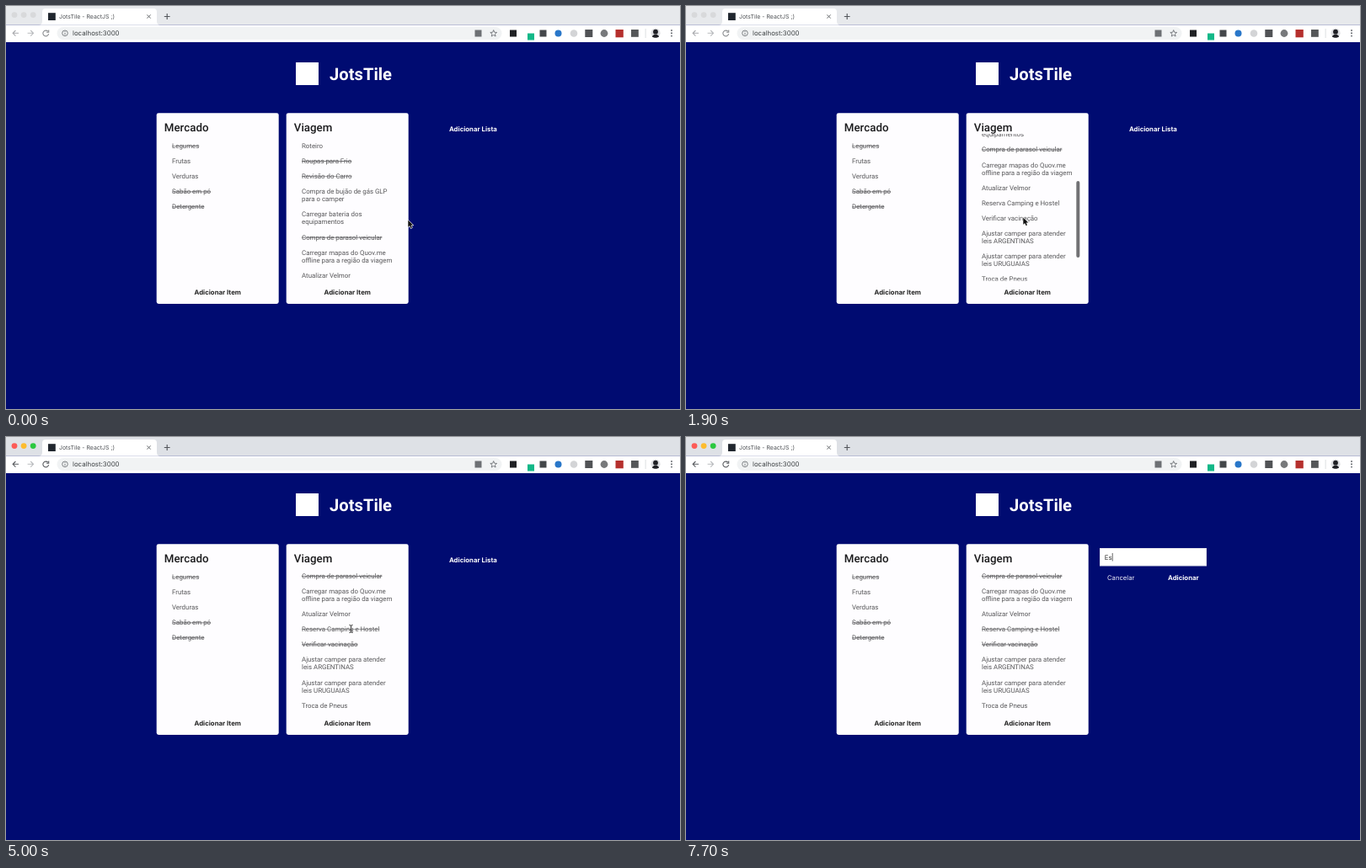
An HTML page with a canvas for the animation above (8000 ms loop, 800 px wide and 479 px high).

```html
<!DOCTYPE html>
<html lang="pt">
<head>
<meta charset="utf-8">
<title>JotsTile - ReactJS ;)</title>
<style>
html, body { margin: 0; width: 100%; height: 100%; overflow: hidden; background: #000b71; }
canvas { display: block; width: 800px; height: 479px; }
</style>
</head>
<body>
<canvas id="stage" width="800" height="479"></canvas>
<script>
const ctx = document.getElementById('stage').getContext('2d');
const LOOP = 8000;
const STEP = 100;
const ROBOTO = 'Roboto, sans-serif';
const INTER = 'Inter, sans-serif';
const ITEM_FONT = `7.88px ${ROBOTO}`;
const BUTTON_FONT = `700 7.8px ${INTER}`;

const time = { windowActive: 2800, formOpen: 6100, focus: 7000, firstKey: 7600, secondKey: 7700 };

const market = [
  { lines: ['Legumes'], done: 0 },
  { lines: ['Frutas'] },
  { lines: ['Verduras'] },
  { lines: ['Sabão em pó'], done: 0 },
  { lines: ['Detergente'], done: 0 },
];
const trip = [
  { lines: ['Roteiro'] },
  { lines: ['Roupas para Frio'], done: 0 },
  { lines: ['Revisão do Carro'], done: 0 },
  { lines: ['Compra de bujão de gás GLP', 'para o camper'] },
  { lines: ['Carregar bateria dos', 'equipamentos'] },
  { lines: ['Compra de parasol veicular'], done: 0 },
  { lines: ['Carregar mapas do Quov.me', 'offline para a região da viagem'] },
  { lines: ['Atualizar Velmor'] },
  { lines: ['Reserva Camping e Hostel'], done: 4600 },
  { lines: ['Verificar vacinação'], done: 3400 },
  { lines: ['Ajustar camper para atender', 'leis ARGENTINAS'] },
  { lines: ['Ajustar camper para atender', 'leis URUGUAIAS'] },
  { lines: ['Troca de Pneus'] },
];

// Keyframes: time, then values
const scrollKeys = [[500, 0], [700, 20], [900, 64], [1100, 84.3], [1200, 85.5],
  [1600, 85.5], [1900, 104.2], [2100, 109.7]];
const cursorKeys = [[0, 477, 254], [400, 399.5, 250], [1300, 399.5, 250], [1500, 400, 251],
  [2400, 400, 251], [3100, 398, 248], [3700, 398, 248], [4200, 409.5, 228],
  [5000, 409.5, 228], [5800, 552, 146], [6300, 552, 146], [6600, 551.5, 149],
  [6900, 551.5, 149], [7500, 575, 274]];

const smooth = p => p * p * (3 - 2 * p);
const linear = p => p;

function sample(keys, t, ease) {
  const next = keys.findIndex(k => k[0] > t);
  if (next === 0) return keys[0].slice(1);
  if (next < 0) return keys[keys.length - 1].slice(1);
  const a = keys[next - 1], b = keys[next];
  const p = ease((t - a[0]) / (b[0] - a[0]));
  return a.slice(1).map((v, i) => v + (b[i + 1] - v) * p);
}

function rect(x, y, w, h, color, r = 0) {
  ctx.fillStyle = color;
  ctx.beginPath();
  ctx.roundRect(x, y, w, h, r);
  ctx.fill();
}

function disc(x, y, r, color) {
  ctx.fillStyle = color;
  ctx.beginPath();
  ctx.arc(x, y, r, 0, Math.PI * 2);
  ctx.fill();
}

function stroke(path, color, width = 1) {
  ctx.strokeStyle = color;
  ctx.lineWidth = width;
  ctx.stroke(new Path2D(path));
}

function text(str, x, y, font, color, align = 'left') {
  ctx.font = font;
  ctx.fillStyle = color;
  ctx.textAlign = align;
  ctx.fillText(str, x, y);
}

function drawTabs(active) {
  rect(0, 0, 800, 22.5, active ? '#dee1e6' : '#e7e9ec');
  const lights = active ? ['#fc5b57', '#fdbc2e', '#2bc840'] : ['#d8d9db', '#d8d9db', '#d8d9db'];
  lights.forEach((color, i) => disc(10 + i * 11.1, 10.6, 3.4, color));

  ctx.fillStyle = '#fff';
  ctx.fill(new Path2D('M39 22.5Q43 22.5 43 18V7Q43 3 47 3H175Q179 3 179 7V18Q179 22.5 183 22.5Z'));
  rect(50, 8.2, 8.8, 8.8, '#20262e');
  text('JotsTile - ReactJS ;)', 63, 15, `6.95px ${INTER}`, '#4b4e52');
  stroke('M167.5 10.4l4.2 4.2m0 -4.2l-4.2 4.2', '#55585c', 0.9);
  stroke('M187.8 12.5h6.8M191.2 9.1v6.8', '#505358', 1.1);
}

function drawToolbar(active) {
  rect(0, 22.5, 800, 20.5, '#fff');
  const nav = active ? '#5a5d61' : '#a9abae';
  stroke('M15 32.3H8.2M11.4 29L8.1 32.3L11.4 35.6', nav, 1.1);
  stroke('M25.6 32.3H32.4M29.2 29L32.5 32.3L29.2 35.6', '#b8babd', 1.1);
  stroke('M49.8 30.2A3.4 3.4 0 1 0 50.6 33.2M50.7 28.6V31.2H48', active ? '#5a5d61' : '#8b8d90', 1.1);

  rect(60.5, 25, 528, 15, '#f1f3f4', 7.5);
  ctx.beginPath();
  ctx.arc(70, 32.3, 3.3, 0, Math.PI * 2);
  ctx.strokeStyle = '#63666a';
  ctx.lineWidth = 0.8;
  ctx.stroke();
  stroke('M70 31.8V34.2M70 30.2V31', '#63666a', 0.8);
  text('localhost:3000', 79, 35.1, `7.87px ${INTER}`, '#3c4043');

  rect(556.5, 28.5, 8, 8, '#6d7074');
  const star = Array.from({ length: 10 }, (_, i) => {
    const a = i * Math.PI / 5 - Math.PI / 2, r = i % 2 ? 1.8 : 4.1;
    return `${578.7 + r * Math.cos(a)} ${32.7 + r * Math.sin(a)}`;
  });
  stroke(`M${star.join('L')}Z`, '#5f6368', 0.8);

  rect(598, 28.5, 8, 8, '#202124');
  rect(619, 32.5, 8, 8, '#13b888');
  rect(633.5, 28.5, 8, 8, '#44474a');
  disc(655.5, 32.5, 4, '#2977c9');
  disc(674, 32.5, 4.3, '#d3d4d6');
  rect(687.3, 28, 9, 9, '#515356');
  disc(710, 32.5, 4.4, '#77797b');
  rect(723.5, 28, 9.3, 9.3, '#b5302d');
  rect(742, 28, 8.8, 8.8, '#555759');
  rect(758.7, 27, 0.8, 11, '#d5d7da');
  drawAvatar(771, 32.2);
  for (const y of [29, 32.3, 35.6]) disc(790, y, 0.95, '#5f6368');
}

function drawAvatar(x, y) {
  ctx.save();
  ctx.beginPath();
  ctx.arc(x, y, 5.6, 0, Math.PI * 2);
  ctx.clip();
  rect(x - 6, y - 6, 12, 12, '#dedfe2');
  disc(x, y - 1.5, 2.9, '#1e1f24');
  disc(x, y + 6, 4.5, '#1e1f24');
  ctx.restore();
}

function drawItems(items, x, t) {
  let y = 169;
  for (const { lines, done = Infinity } of items) {
    lines.forEach((line, i) => {
      text(line, x, y + i * 9, ITEM_FONT, '#565658');
      if (t >= done) rect(x, y + i * 9 - 2.8, ctx.measureText(line).width, 0.65, '#565658');
    });
    y += 18.1 + (lines.length - 1) * 9.05;
  }
}

function drawCard(x, title, items, t, offset = 0) {
  rect(x - 0.3, 127.2, 145, 226.7, '#fefdff', 2.4);
  ctx.save();
  ctx.beginPath();
  ctx.rect(x, 152, 144.5, 174.4);
  ctx.clip();
  ctx.translate(0, -offset);
  drawItems(items, x + 18, t);
  ctx.restore();
  text(title, x + 8.8, 149.3, `500 13.33px ${ROBOTO}`, '#1c1c1e');
  text('Adicionar Item', x + 72.2, 343.2, BUTTON_FONT, '#222', 'center');
}

function drawScrollbar(t, offset) {
  if (t < 600 || t >= 2700) return;
  ctx.globalAlpha = Math.min(1, (2700 - t) / 400);
  rect(463.3, 156 + offset / 2, 4, 91, '#717174', 2);
  ctx.globalAlpha = 1;
}

function drawForm(t) {
  if (t < time.formOpen) {
    text('Adicionar Lista', 554.4, 149, BUTTON_FONT, '#fff', 'center');
    return;
  }
  rect(491, 132, 127, 21.3, '#fff');
  ctx.strokeStyle = '#d6d7e2';
  ctx.lineWidth = 0.6;
  ctx.strokeRect(491.3, 132.3, 126.4, 20.7);
  const typed = t >= time.secondKey ? 'Es' : t >= time.firstKey ? 'E' : '';
  text(typed, 496.7, 145.8, `7.8px ${INTER}`, '#333');
  if (t >= time.focus) rect(497 + ctx.measureText(typed).width, 138, 0.7, 9.4, '#222');
  text('Cancelar', 500, 169.8, `7.7px ${INTER}`, '#f0f0fa');
  text('Adicionar', 608.7, 169.8, BUTTON_FONT, '#fff', 'right');
}

function drawArrow(x, y) {
  const arrow = new Path2D('M0 0V8.2L1.9 6.5L3.2 9.5L4.7 8.9L3.4 6H6Z');
  ctx.save();
  ctx.translate(x + 0.3, y + 0.6);
  ctx.lineJoin = 'round';
  ctx.strokeStyle = '#fff';
  ctx.lineWidth = 1.2;
  ctx.stroke(arrow);
  ctx.fillStyle = '#111';
  ctx.fill(arrow);
  ctx.restore();
}

function drawBeam(x, y) {
  ctx.save();
  ctx.translate(x, y);
  const beam = 'M-2 -4.6Q0 -4.6 0 -3.2Q0 -4.6 2 -4.6M0 -3.4V3.4M-2 4.6Q0 4.6 0 3.2Q0 4.6 2 4.6M-1 1.4H1';
  stroke(beam, 'rgba(255,255,255,.8)', 1.8);
  stroke(beam, '#222', 0.9);
  ctx.restore();
}

function drawCursor(t) {
  if (t >= time.firstKey) return;
  const [x, y] = sample(cursorKeys, t, smooth);
  const overItem = t >= time.windowActive && x < 460;
  const overInput = t >= time.formOpen && y < 153;
  (overItem || overInput ? drawBeam : drawArrow)(x, y);
}

function draw(t) {
  const active = t >= time.windowActive;
  const [offset] = sample(scrollKeys, t, linear);
  ctx.textRendering = 'geometricPrecision';
  rect(0, 0, 800, 479, '#000b71');
  drawTabs(active);
  drawToolbar(active);
  rect(344, 67, 27, 27, '#fff');
  text('JotsTile', 384, 87.8, `700 20.2px ${ROBOTO}`, '#fff');
  drawCard(179, 'Mercado', market, t);
  drawCard(333, 'Viagem', trip, t, offset);
  drawScrollbar(t, offset);
  drawForm(t);
  drawCursor(t);
}

const start = performance.now();
function tick() {
  const t = (performance.now() - start) % LOOP;
  draw(Math.floor(t / STEP) * STEP);
  requestAnimationFrame(tick);
}
tick();
</script>
</body>
</html>
```
